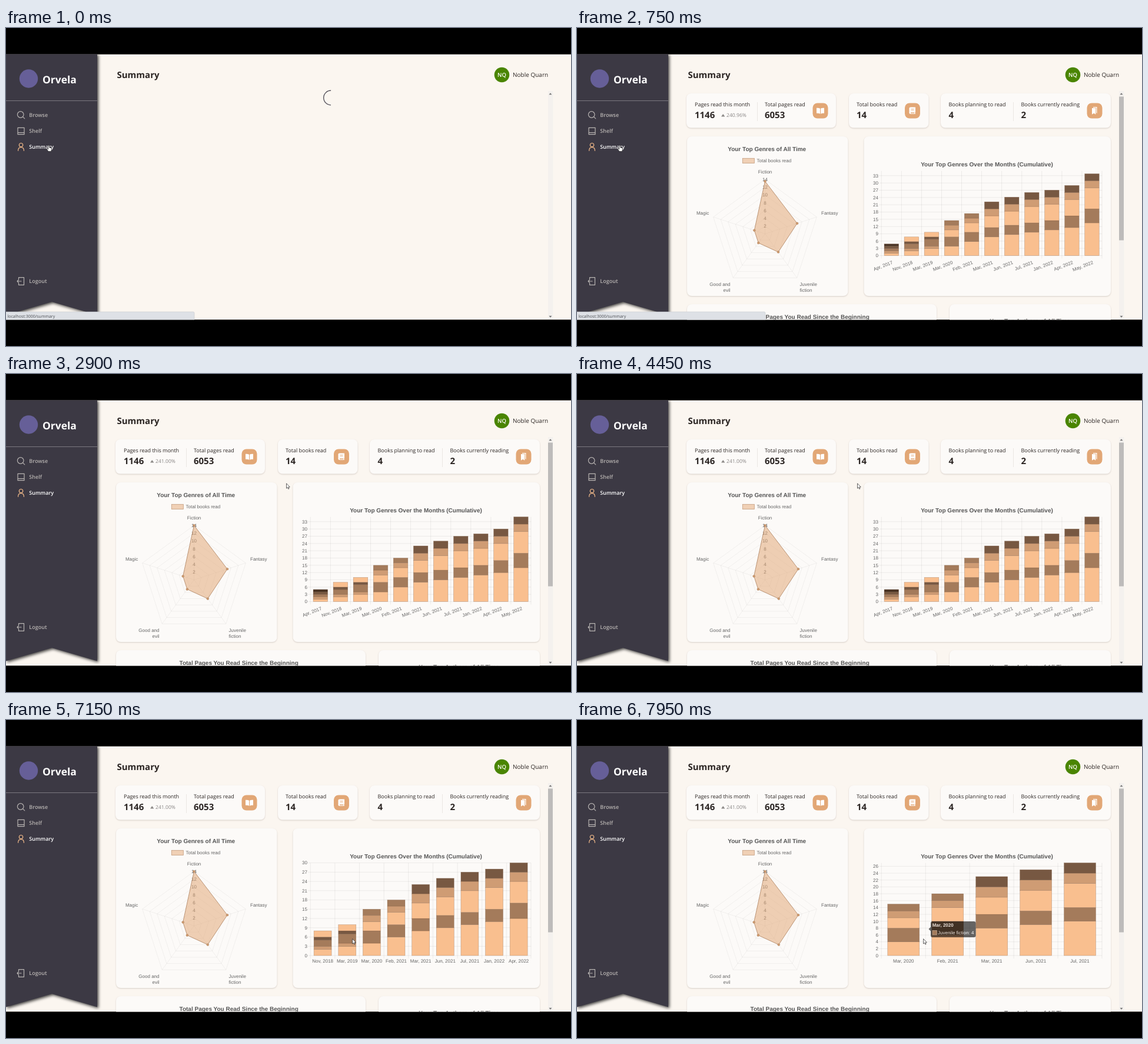
An HTML page for the animation above (8000 ms loop, 960x540 px).

```html
<!DOCTYPE html>
<html lang="en">
<head>
<meta charset="utf-8">
<title>Reading summary</title>
<style>
  html, body { margin: 0; width: 100%; height: 100%; overflow: hidden; background: #000; }
  svg { display: block; width: 960px; height: 540px; text-rendering: geometricPrecision; }
  text { font-family: "Open Sans", "Noto Sans", sans-serif; fill: #2b2523; }
  .chart text { font: 8px "Liberation Sans", Arial, sans-serif; fill: #666; }
  .chart .title { font-size: 10px; font-weight: 700; fill: #555; }
  .label { font-size: 9px; }
  .value { font-size: 15px; font-weight: 700; }
  .card { fill: #fcfaf8; filter: drop-shadow(0 1.5px 1.2px rgba(70, 50, 40, .2)); }
  .line { stroke: #e6e2de; stroke-width: .8; }
  .badge { fill: #e2a776; }
  .glyph { fill: #fff; }
  .mid { text-anchor: middle; }
  .end { text-anchor: end; }
  .nav text { font-size: 9px; font-weight: 600; fill: #b7b3b1; }
  .nav path { fill: none; stroke: #b7b3b1; stroke-width: 1.2; stroke-linecap: round; stroke-linejoin: round; }
  .nav .on text { fill: #fff; }
  .nav .on path { stroke: #f3bb8a; }
  #spinner { transform-origin: 552px 118.5px; animation: spin .8s linear infinite; }
  @keyframes spin { to { transform: rotate(360deg); } }
</style>
</head>
<body>
<svg viewBox="0 0 960 540">
  <defs>
    <clipPath id="app"><rect y="44.5" width="960" height="451"/></clipPath>
  </defs>
  <rect width="960" height="540"/>
  <g clip-path="url(#app)">
    <rect y="44.5" width="960" height="451" fill="#fbf6f0"/>

    <text x="188.5" y="85" style="font-size:15px;font-weight:700">Summary</text>
    <circle cx="842.5" cy="79.5" r="12.8" fill="#4a8502"/>
    <text x="842.5" y="83" class="mid" style="font-size:9.5px;font-weight:600;fill:#fff">NQ</text>
    <text x="861" y="83" style="font-size:10px">Noble Quarn</text>

    <rect x="921" y="107" width="8.5" height="388" fill="#f4f1ee"/>
    <path d="M922.5 113.2l2.5-3 2.5 3zM922.5 488.8l2.5 3 2.5-3z" fill="#777"/>

    <path id="spinner" d="M552 106.2a12.3 12.3 0 0 0 0 24.6" fill="none" stroke="#3c3945" stroke-width="1.2"/>

    <g id="page">
      <rect x="921" y="116.5" width="8" height="244" fill="#bdbbba"/>
      <g id="cards"></g>
      <path class="line" d="M306.5 126v32M741.5 126v32"/>
      <g id="stats"></g>
      <path d="M245 150.5l3.2-4.6 3.2 4.6z" fill="#8d8a88"/>
      <text id="percent" x="254" y="151" style="font-size:8.6px;fill:#8a8786"></text>

      <g class="badge">
        <rect x="400.5" y="127.5" width="26" height="26" rx="8"/>
        <rect x="557" y="127.5" width="26" height="26" rx="8"/>
        <rect x="866.5" y="127.5" width="26" height="26" rx="8"/>
      </g>
      <g class="glyph">
        <path d="M407 135.8q3.5-.6 6 .9v9q-2.500-1.500-6-.9zM420 135.800q-3.500-.6-6 .9v9q2.500-1.500 6-.9z"/>
        <path fill-rule="evenodd" d="M566.500 134.500h8.500v8.500l-.6.8v1.400h.6v.9h-8.500q-2-.2-2-2v-7.600q0-2 2-2zM567 143.500v1.400h6.200v-1.400zM567.500 137h5v.8h-5zM567.500 139h5v.8h-5z"/>
        <path d="M877 134h6.500v11l-1.200-1v-8.800H877zM875 136h6.300v10.800l-3.150-2-3.150 2z"/>
      </g>

      <g class="chart">
        <text class="title mid" x="322.700" y="208.500">Your Top Genres of All Time</text>
        <rect x="281.300" y="221.300" width="20" height="8.200" fill="#f0d0b5" stroke="#c39c7c" stroke-width=".8"/>
        <text x="305.500" y="228">Total books read</text>
        <text class="mid" x="319.500" y="247">Fiction</text>
        <text x="415" y="317">Fantasy</text>
        <text x="378.500" y="438">Juvenile</text><text x="378.500" y="448">fiction</text>
        <text class="end" x="260.500" y="438">Good and</text><text class="end" x="260.500" y="448">evil</text>
        <text class="end" x="224.300" y="317">Magic</text>
        <g id="web"></g>
        <g id="radar"></g>
        <text class="title mid" x="696.500" y="235">Your Top Genres Over the Months (Cumulative)</text>
        <g id="bars"></g>
        <g id="tip">
          <path d="M597.500 355l3.500-3.500v-6.500q0-3 3-3h70.500q3 0 3 3v21q0 3-3 3H604q-3 0-3-3v-7.500z" fill="#000" fill-opacity=".8"/>
          <text x="603.700" y="351" style="font-weight:700;fill:#fff">Mar, 2020</text>
          <rect x="604" y="357.500" width="7.300" height="7.300" fill="#a47b5b" stroke="#d8c3b2" stroke-width=".7"/>
          <text x="613" y="363.500" style="fill:#fff">Juvenile fiction: 4</text>
        </g>
        <text class="title mid" x="395.700" y="494">Total Pages You Read Since the Beginning</text>
        <text class="title mid" x="769.500" y="500.500">Your Top Authors of All Time</text>
      </g>
    </g>

    <g class="nav">
      <path d="M0 44H155V487.500L78 465 0 487.500z" style="fill:#3c3944;stroke:none;filter:drop-shadow(2px 2px 2.500px rgba(0,0,0,.75))"/>
      <path d="M0 123.500H155" style="stroke:#7b7880;stroke-width:1"/>
      <circle cx="38.500" cy="86" r="15.700" fill="#665f98"/>
      <text x="62" y="94" style="font-size:17.400px;font-weight:700;fill:#fff">Orvela</text>
      <g>
        <path d="M30 147a5.300 5.300 0 1 0-10.600 0a5.300 5.300 0 1 0 10.600 0M28.700 150.800l3 3"/>
        <text x="39.300" y="150.500">Browse</text>
      </g>
      <g id="shelf">
        <path d="M20 169.300h11v11.400H20zM20 177.600h11"/>
        <text x="39.300" y="178">Shelf</text>
      </g>
      <g class="on">
        <path d="M28.700 198.700a3.200 3.200 0 1 0-6.400 0a3.200 3.200 0 1 0 6.400 0M20.600 208.300q0-5.700 4.900-5.700t4.900 5.700"/>
        <text x="39.300" y="205">Summary</text>
      </g>
      <g>
        <path d="M21.500 427v-3.300h9v12.600h-9v-3.300M19 430h7M21 428l-2 2 2 2"/>
        <text x="39.300" y="433">Logout</text>
      </g>
    </g>

    <g id="status">
      <path id="statusBox" fill="#dee1e6" stroke="#c6c9ce" stroke-width=".6"/>
      <text id="statusText" x="2.500" y="491.500" style="font-size:7px;fill:#4a4d52"></text>
    </g>
  </g>

  <g id="cursor" fill="#fff" stroke="#222" stroke-width=".7" stroke-linejoin="round">
    <path id="hand" d="M-.9 .6Q0-.5 .9 .6V4L4 4.700Q5 5 4.800 6.500L4 10.600H-.6L-3.400 7Q-3.600 5.600-2.300 6L-.9 7z"/>
    <path id="arrow" d="M0 0V8.400L1.900 6.700 3.200 9.500 4.500 8.900 3.300 6.200H5.800z"/>
  </g>
</svg>

<script>
const LOOP = 8000, STEP = 50;
const PAGE_AT = 150, COUNT_AT = 160, CHART_AT = 180, CHART_MS = 1000;
const TIP_IN = 7600, TIP_OUT = 7850;

const $ = id => document.getElementById(id);
const clamp = v => Math.min(1, Math.max(0, v));
const show = (node, on) => { node.style.display = on ? "" : "none"; };
const outQuart = p => 1 - (1 - p) ** 4;
const outExpo = p => (1 - 2 ** (-10 * p)) * 1024 / 1023;
const smooth = p => p * p * (3 - 2 * p);

const tones = { L: "#f9bf8f", T: "#cf9c74", B: "#a47b5b", D: "#775842", K: "#4a3425" };

// Each month stacks its genres from the bottom: tone, then number of books.
const months = `Apr, 2017|L1T1B1D1K1
Nov, 2018|L2T1B2D1L2
Mar, 2019|L3T1B3D1L2
Mar, 2020|L4B4L3T2B2
Feb, 2021|L6B4L4T2B2
Mar, 2021|L8B4L5T3D3
Jun, 2021|L9B4L6T3D3
Jul, 2021|L10B4L7T3D3
Jan, 2022|L11B4L7T3D3
Apr, 2022|L12B5L7T3D3
May, 2022|L14B6L9T3D3`.split("\n").map(row => {
  const [name, stack] = row.split("|");
  return { name, stack: [...stack.matchAll(/([A-Z])(\d+)/g)].map(m => [m[1], +m[2]]) };
});

const views = [
  { at: 0, trim: 0, max: 35, step: 3, base: 386.5 },
  { at: 6900, trim: 1, max: 30, step: 3, base: 400 },
  { at: 7500, trim: 2, max: 28, step: 2, base: 400 },
  { at: 7850, trim: 3, max: 27, step: 2, base: 400 }
];

function drawBars({ trim, max, step, base }, grow) {
  const left = 517.3, right = 892, top = 242.6;
  const shown = months.slice(trim, months.length - trim);
  const slot = (right - left) / shown.length, width = slot * .72;
  const unit = (base - top) / max;
  let grid = "", out = "";
  for (let v = 0; v <= max; v += step) {
    const y = base - v * unit;
    grid += `M${left - 5} ${y}H${right}`;
    out += `<text class="end" x="512" y="${y + 2.8}">${v}</text>`;
  }
  for (let i = 0; i <= shown.length; i++) grid += `M${left + i * slot} ${top}V${base + 5}`;
  shown.forEach(({ name, stack }, i) => {
    const x = left + (i + .5) * slot;
    let sum = 0;
    for (const [tone, n] of stack) {
      sum += n;
      out += `<rect x="${x - width / 2}" y="${base - sum * unit * grow}" width="${width}" height="${n * unit * grow}"
        fill="${tones[tone]}" stroke="#6d4a30" stroke-opacity=".4" stroke-width=".6"/>`;
    }
    out += trim
      ? `<text class="mid" x="${x}" y="412">${name}</text>`
      : `<text class="end" transform="translate(${x} 393.5) rotate(-21)" y="7.2">${name}</text>`;
  });
  $("bars").innerHTML = `<path d="${grid}" stroke="#000" stroke-opacity=".09" stroke-width=".7"/>` + out;
}

const spoke = (i, v) => {
  const a = i * Math.PI * .4, r = v * 6.6;
  return [319.5 + r * Math.sin(a), 349.5 - r * Math.cos(a)];
};
const polygon = (values, style) =>
  `<polygon points="${values.map((v, i) => spoke(i, v)).join(" ")}" ${style}/>`;

function drawWeb() {
  const faint = 'fill="none" stroke="#000" stroke-opacity=".07" stroke-width=".7"';
  let out = "";
  for (let v = 2; v <= 14; v += 2) out += polygon(Array(5).fill(v), faint);
  for (let i = 0; i < 5; i++) out += `<path d="M319.5 349.5L${spoke(i, 14)}" ${faint}/>`;
  for (let v = 2; v <= 14; v += 2)
    out += `<text class="mid" x="319.5" y="${352.4 - v * 6.6}">${v}</text>`;
  $("web").innerHTML = out;
}

function drawRadar(grow) {
  const values = [14, 9, 6, 3, 3].map(v => v * grow);
  $("radar").innerHTML =
    polygon(values, 'fill="#e2a776" fill-opacity=".52" stroke="#b58c6b" stroke-width=".9"') +
    values.map((v, i) => {
      const [x, y] = spoke(i, v);
      return `<circle cx="${x}" cy="${y}" r="1.9" fill="#d09a6d" stroke="#a9805f" stroke-width=".5"/>`;
    }).join("");
}

const stats = [
  [200, "Pages read this month", 1146], [319, "Total pages read", 6053],
  [475, "Total books read", 14], [631.5, "Books planning to read", 4],
  [754.5, "Books currently reading", 2]
];
$("stats").innerHTML = stats.map(([x, label]) =>
  `<text class="label" x="${x}" y="133">${label}</text><text class="value" x="${x}" y="153"></text>`).join("");
const counters = [...document.querySelectorAll(".value")];

$("cards").innerHTML = [
  [186, 111, 254, 58.5], [462, 111, 135.5, 58.5], [618, 111, 289, 58.5],
  [187, 184, 273.5, 271], [487.5, 184, 419.5, 271],
  [187, 469, 424, 60], [633, 469, 274, 60]
].map(([x, y, w, h]) => `<rect class="card" x="${x}" y="${y}" width="${w}" height="${h}" rx="8"/>`).join("");

const route = [
  [0, 72.7, 199], [900, 72.7, 199], [1400, 133.7, 174], [1500, 133.7, 174],
  [2200, 476.5, 185.8], [5000, 476.5, 185.8], [5750, 519.2, 393.5],
  [6300, 588.6, 371.6], [LOOP, 588.6, 371.6]
];
function cursorAt(t) {
  const i = route.findIndex(p => p[0] > t);
  const [t0, x0, y0] = route[i - 1], [t1, x1, y1] = route[i];
  const p = smooth((t - t0) / (t1 - t0));
  return [x0 + (x1 - x0) * p, y0 + (y1 - y0) * p];
}

let drawn = "";
function render(t) {
  const loaded = t >= PAGE_AT;
  show($("page"), loaded);
  show($("spinner"), !loaded);

  const count = outExpo(clamp((t - COUNT_AT) / 604));
  const quick = outExpo(clamp((t - COUNT_AT) / 560));
  counters.forEach((node, i) => { node.textContent = Math.round(stats[i][2] * quick); });
  $("percent").textContent = (241 * count).toFixed(2) + "%";

  const view = views.findLast(v => t >= v.at);
  const grow = outQuart(clamp((t - CHART_AT) / CHART_MS));
  const key = view.at + ":" + grow;
  if (key !== drawn) {
    drawBars(view, grow);
    drawRadar(grow);
    drawn = key;
  }
  $("tip").style.opacity = clamp((t - TIP_IN) / 200) * (1 - clamp((t - TIP_OUT) / 400));

  const [x, y] = cursorAt(t);
  const inMenu = x < 155, onShelf = inMenu && y < 188;
  $("cursor").setAttribute("transform", `translate(${x} ${y})`);
  show($("hand"), inMenu);
  show($("arrow"), !inMenu);
  $("shelf").classList.toggle("on", onShelf);
  show($("status"), inMenu);
  $("statusText").textContent = "localhost:3000/" + (onShelf ? "shelf" : "summary");
  $("statusBox").setAttribute("d", `M-1 482H${onShelf ? 72 : 318}q2 0 2 2v13H-1z`);
}

drawWeb();
function tick() {
  render(Math.floor(performance.now() % LOOP / STEP) * STEP);
  requestAnimationFrame(tick);
}
tick();
</script>
</body>
</html>
```
